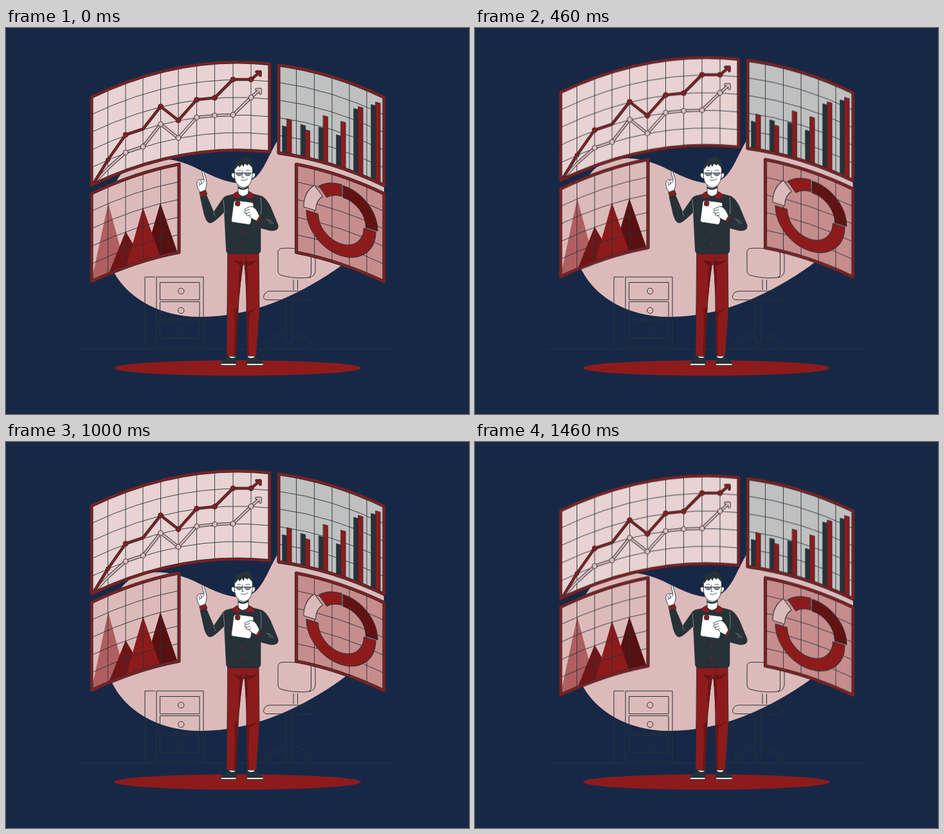
Recreate the animation shown at these times as an HTML page. Size 720 px wide and 600 px high, loop 1500 ms.

```html
<!DOCTYPE html>
<html lang="en">
<head>
<meta charset="utf-8">
<title>Floating dashboards</title>
<style>
  html, body { margin: 0; width: 100%; height: 100%; overflow: hidden; background: #172846; }
  svg { display: block; width: 720px; height: 600px; }
  .line { fill: none; stroke: #263238; stroke-width: 1; }
  .skin { fill: #fff; stroke: #263238; stroke-width: .9; stroke-linejoin: round; }
  .red { fill: #8e1b1c; }
  .shade { fill: #6b1517; }
  .dark { fill: #263238; }
  .fold { fill: none; stroke: #8f979b; stroke-width: .8; }
  .trim { fill: #8e1b1c; stroke: #263238; stroke-width: .9; }
  /* the picture advances 24 times a second */
  #panels { animation: drift 1500ms -4ms steps(18) infinite; }
  @keyframes drift {
    50% { transform: translateY(-12px); }
  }
</style>
</head>
<body>
<svg viewBox="0 0 720 600">
  <rect width="720" height="600" fill="#172846"/>
  <path fill="#ddbaba" d="M421 177C411 193 401 222 387 233C360 253 322 230 290 215C262 202 228 199 205 207C180 216 165 245 158 275C148 315 150 350 168 380C190 420 240 450 305 449C385 449 465 412 530 363C572 337 588 300 588 250C588 190 560 130 490 125C450 125 432 157 421 177Z"/>

  <g class="line">
    <path d="M111 499H608"/>
    <path d="M232 387H216V497M234 497V387H307V497M234 496H307"/>
    <path d="M239.500 395.500H301V422.500H239.500ZM239.500 425.500H301V453H239.500ZM239.500 456H301V482.500H239.500Z"/>
    <circle cx="272.300" cy="409" r="4.600"/>
    <circle cx="272.300" cy="439" r="4.600"/>
    <circle cx="272.300" cy="469" r="4.600"/>
    <path d="M429 342.500C442 341.500 458 343 471 346Q474.500 347 474.500 351V383Q474 387 470 388C455 389.500 440 388 427 384Q423 382 423 378V348Q423.500 343 429 342.500Z"/>
    <path d="M472 345Q481 346 481 354V377Q481 386 471 388"/>
    <path d="M447 391V407M453.500 391V407"/>
    <path d="M405 422.500Q399 421 401 416Q403 409.500 410 409H468Q475 411 478 420Q479 423 472 423Z"/>
    <path d="M435 423V472M444 423V472"/>
    <path d="M435 472Q414 476 403 488M436 478Q420 481 411 488M444 472Q465 476 477 488M443 478Q460 481 469 488M436 474V489M444 474V489"/>
    <circle cx="407" cy="492" r="4"/><circle cx="440" cy="493" r="4"/><circle cx="473" cy="492" r="4"/>
  </g>

  <ellipse class="red" cx="360" cy="528.500" rx="192" ry="12"/>
  <g id="panels" stroke-linejoin="round" stroke-linecap="round"></g>

  <g id="man" stroke-linecap="round">
    <path class="skin" d="M347 506H357V514H347ZM376 506H387V514H376Z"/>
    <path class="skin" d="M334.500 520.500H358V524.300H335Q334 523 334.500 520.500ZM374.500 520.500H400Q400.500 523 399.500 524.300H375Z"/>
    <path class="dark" d="M334.500 522Q335 516.500 342 515L347 511Q352 514.500 357 511.500Q359 517 358.500 522ZM400 522Q399 516.500 392 515L387 511Q382 514.500 376 511.500Q374 517 374.500 522Z"/>
    <path class="trim" d="M345 349H393L394 440L389 510H375L374 440Q374 395 371 368H368.500Q363 400 361 440L357.500 511L343 509.500L344 430Z"/>
    <path class="shade" d="M353 360Q361 363 368 362V369L362.500 420Q361 380 364 370Q357 366 353 360ZM392 360Q383 364 371 362V369L374 420Q377 385 375 370Q386 367 392 360ZM355 437Q359 437 361 432L358 509H354Q357 470 355 437ZM376 440Q382 441 390 433Q386 440 379 444Q376 470 378 509H375L374 435Z"/>
    <path class="line" d="M374 351Q375 360 371 366" style="stroke-width:.7"/>

    <path fill="#263238" stroke="#1d282d" stroke-width=".6" d="M360 257L345 260.500Q339 261.500 336 267L323 286L311 258L302 262L308 289Q312 304 318 303Q324 302 339.500 286L342.500 346Q343 351 349 351H391Q396 350 396 345V311L411 315Q425 316 423 306L411 277Q403 262 396 261L377 256Z"/>
    <path class="fold" d="M323 286Q323 291 326 293M338 266L340 288M396 264Q398 277 396.500 290M405 297Q412 299 416 304M408 301L412 304"/>
    <circle class="red" cx="368" cy="318" r="1.400"/>
    <circle class="red" cx="368" cy="334.500" r="1.400"/>

    <path class="skin" d="M361 242V257Q368 266 377 257V240Z"/>
    <path class="dark" d="M361 246Q369 252.500 377 245V248.500Q369 254 361 249.500Z"/>
    <path class="trim" d="M358 255Q352 258 351 263L362 265.500L366 262Q360 259 361 255ZM378 254Q386 258 387 263L377 266L371 262Q378 260 377 255Z"/>

    <path class="trim" d="M301 256L310 251.500L313 258.500L303 262Z"/>
    <path class="skin" d="M301.500 255Q296 247 297 240Q298.500 235 303 236L308 235.500L305 225Q304.500 222 307 222L311.500 236Q313 246 309.500 252Z"/>
    <path class="line" d="M300 239L301.500 244M303 237L304 243M308 236Q308.500 240 305 241L300 245" style="stroke-width:.8"/>

    <path class="skin" d="M358 268L382 271Q385.500 272 385 275L381 302Q380 306 377 305.500L353 302Q350 301.500 350.500 298L354 271Q355 268 358 268Z"/>
    <rect class="trim" x="356.500" y="269" width="7.300" height="7.500" rx="2.500" transform="rotate(8 360 273)"/>
    <path class="trim" d="M389 295L393.500 290L396.500 292L393 303L389 301Z"/>
    <path class="skin" d="M394 292Q390 281 384 278Q379 276.500 377 279L372.500 280.500Q369.500 282 372.500 283.500L371 286Q371 288.500 374 288L373.500 290.500Q375 292.500 378 291.500Q381 297 389.500 299.500Z"/>
    <path class="line" d="M373 283.500L379 282.500M374 288L379.500 286.500M378 291.500L381 290" style="stroke-width:.8"/>

    <path class="skin" d="M355 226Q351 223.500 350.500 228Q351 234 356 234ZM383 226Q388 223.500 387.500 229Q386 234 382 234Z"/>
    <path class="skin" d="M355.500 217Q354 236 359 242Q363 247.500 369 248Q377 247 380 241Q384 235 383.500 214L370 207Z"/>
    <path class="dark" d="M357 220Q353 212 359 208.500L357.500 207Q362 207.500 364 204Q368 200 378 200.500L376 203Q380 202 383 206L381 206.500Q386 212 383.500 221L382 216L377 211L376 214L371.500 211L369 216L367 212L363 217L361.500 213.500L358.500 217Z"/>
    <path class="line" style="stroke-width:.8" d="M355 225.500H385M360 221.500Q362 220.500 365 221.500M373 221.500Q376 220.500 379 221.500M368 222L367 232.500H369.500M365.500 236Q371 238.500 376 234.500"/>
    <path fill="#858b99" stroke="#263238" stroke-width=".8" d="M358 225.200H367Q366.500 229.800 362.500 229.800T358 225.200ZM371 225.200H380.500Q380 229.800 376 229.800T371 225.200Z"/>
  </g>
</svg>
<script>
const RED = '#8e1b1c', INK = '#263238', PINK = '#ddbaba';
const COLS = [158.5, 186, 213, 240.5, 268, 296.5, 324.5, 353, 381, 451.5, 479.5, 507, 534, 561];
const HEIGHT = 137, LOWER = 150;

// every panel edge lies on one parabola, moved down by dy
const edgeY = (x, dy = 0) => 53 + 0.00105 * (x - 360) ** 2 + dy;
const curve = (x0, x1, dy) => {
  const mid = (x0 + x1) / 2;
  const cy = edgeY(x0, dy) + 0.0021 * (x0 - 360) * (mid - x0);
  return `${x0} ${edgeY(x0, dy)}Q${mid} ${cy} ${x1} ${edgeY(x1, dy)}`;
};
const path = (d, fill, stroke = 'none', width = 1) =>
  `<path d="${d}" fill="${fill}" stroke="${stroke}" stroke-width="${width}"/>`;

function grid(x0, x1, dy) {
  let d = '';
  for (let i = 1; i < 5; i++) d += 'M' + curve(x0, x1, dy + HEIGHT * i / 5);
  for (const x of COLS)
    if (x > x0 + 5 && x < x1 - 5) d += `M${x} ${edgeY(x, dy)}v${HEIGHT}`;
  return path(d, 'none', INK, .9);
}

function panel(x0, x1, dy, fill, under, over) {
  const d = `M${curve(x0, x1, dy)}L${curve(x1, x0, dy + HEIGHT)}Z`;
  return path(d, fill) + under + grid(x0, x1, dy) + over +
    path(d, 'none', INK, 5.2) + path(d, 'none', RED, 3);
}

function trend(ys, tip, color, firstDot) {
  const pts = ys.map((y, i) => [COLS[i], y]);
  const line = `M136 242L${pts.join('L')}L${tip}`;
  const head = `M${tip}m-6 0h6v6`;
  const dots = pts.map(([cx, cy], i) =>
    i < firstDot || (color === RED && i === 2) ? '' :
    `<circle cx="${cx}" cy="${cy}" r="${i ? 3.9 : 3.2}" fill="${color}" stroke="${INK}" stroke-width=".9"/>`);
  return path(line + head, 'none', INK, 4.6) + path(line + head, 'none', color, 2.7) + dots.join('');
}

function bar(x, top, color) {
  const r = x + 7.2;
  return path(`M${x} ${top}L${r} ${top + 2}V${edgeY(r, HEIGHT)}L${x} ${edgeY(x, HEIGHT)}Z`, color, INK, .8);
}

function peak(x, top, color) {
  const l = x - 26, r = x + 26.5, dy = LOWER + HEIGHT - 1;
  return path(`M${x} ${top}L${r} ${edgeY(r, dy)}L${l} ${edgeY(l, dy)}Z`, color);
}

// ring piece between two angles in degrees, moved out by dx, dy
function slice(a, b, color, dx = 0, dy = 0) {
  const at = (deg, r) => {
    const t = deg * Math.PI / 180;
    return `${r * Math.cos(t) + dx} ${r * Math.sin(t) + dy}`;
  };
  const R = 54, r = 35.5;
  return path(`M${at(a, R)}A${R} ${R} 0 0 1 ${at(b, R)}L${at(b, r)}A${r} ${r} 0 0 0 ${at(a, r)}Z`, color, INK, 1);
}

const trends =
  trend([218, 193.5, 184.5, 149.5, 171, 139, 136, 135, 108], [395.5, 95.5], PINK, 1) +
  trend([205, 166, 157, 122, 143.5, 111.5, 108.5, 80, 80], [395.5, 68], RED, 0);

const bars = [[430, 152, 141], [458.5, 150, 158], [486.5, 154, 136], [514, 166, 145], [541, 125, 122], [568, 119, 115]]
  .map(([x, a, b]) => bar(x, a, INK) + bar(x + 6.9, b, RED)).join('');

const peaks = peak(159, 272, '#b05f60') + peak(240, 272, '#581011') +
  peak(186, 316, '#701516') + peak(213, 279, RED);

const ring = `<g transform="matrix(1 .31 0 1 521 300)">` +
  slice(0, 180, RED) + slice(180, 226, PINK, -4, -4) +
  slice(229, 270, RED, 1, -3) + slice(270, 360, '#611314', 3, -2) + '</g>';

document.getElementById('panels').innerHTML =
  panel(133, 269, LOWER, PINK, peaks, '') +
  panel(451.5, 588, LOWER, '#c78d8d', '', ring) +
  panel(133, 410, 0, '#e8d2d2', '', trends) +
  panel(424, 588, 0, '#c0c0c0', '', bars);
</script>
</body>
</html>
```
